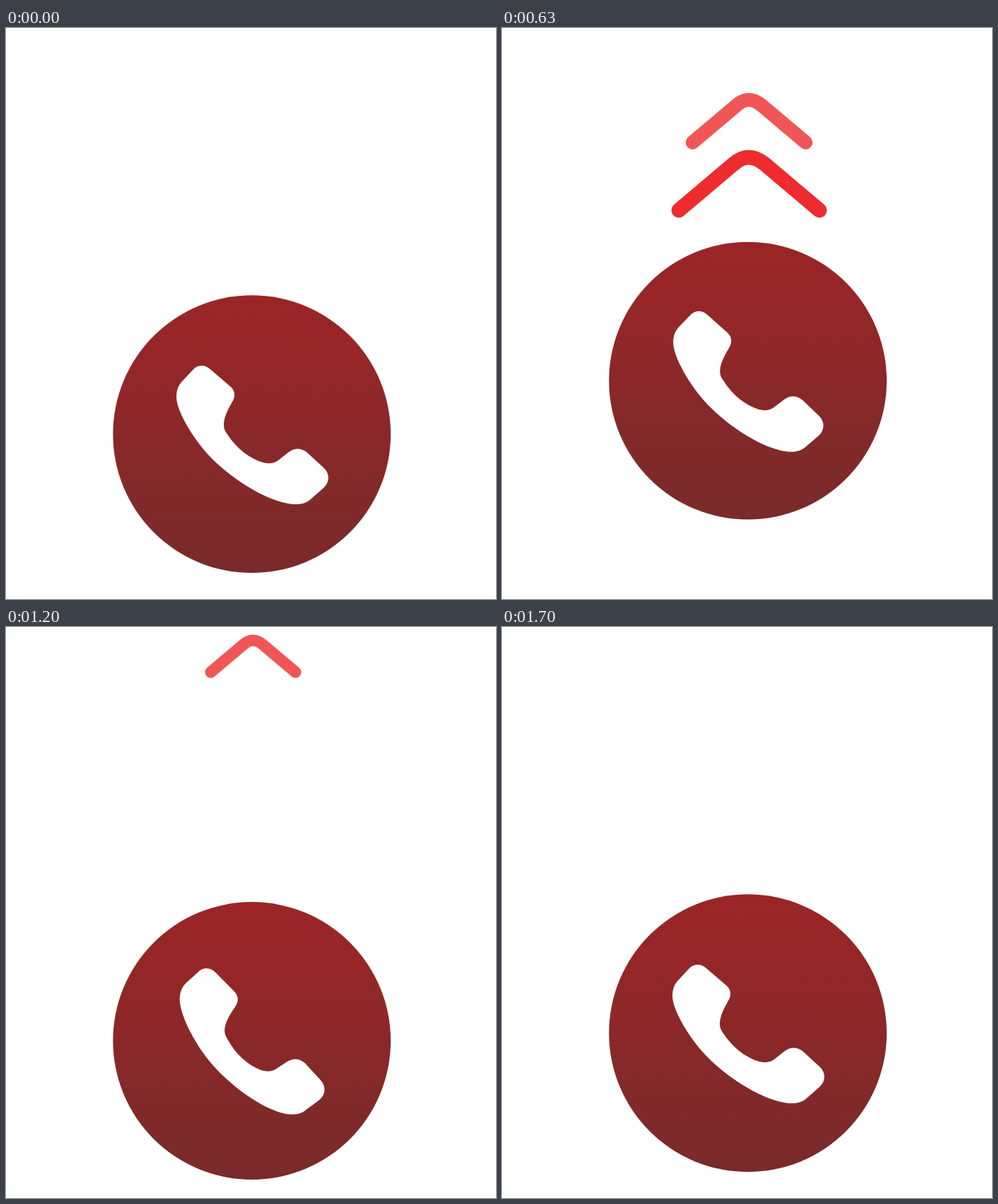
Write an HTML page with a canvas that moves like this. It is 693 px wide and 808 px high and loops after 2000 ms.

```html
<!DOCTYPE html>
<html lang="en">
<head>
<meta charset="utf-8">
<title>Incoming call</title>
<style>
  html, body { margin: 0; width: 100%; height: 100%; overflow: hidden; background: #fff; }
  canvas { display: block; }
</style>
</head>
<body>
<canvas id="stage" width="693" height="808"></canvas>
<script>
const ctx = document.getElementById('stage').getContext('2d');
const LOOP = 2000;
const CENTER = { x: 347.7, y: 574.7, r: 196.4 };

const handset = new Path2D(
  'M289 483 L317 507 C324 513 325 521 320 529 C313 541 308 552 308 562 ' +
  'C308 567 310 571 313 575 C326 595 344 609 364 615 C373 617 380 616 386 611 ' +
  'L400 600 C408 594 417 594 425 600 L449 622 C458 630 458 642 450 650 ' +
  'L433 665 C427 671 420 674 410 674 C380 674 331 647 296 614 ' +
  'C264 583 241 541 241 522 C241 512 244 505 250 499 L264 484 C271 476 281 476 289 483 Z');

const discFill = ctx.createLinearGradient(0, CENTER.y - CENTER.r, 0, CENTER.y + CENTER.r);
discFill.addColorStop(0, '#9b2526');
discFill.addColorStop(0.2, '#962627');
discFill.addColorStop(0.85, '#7d2a2a');
discFill.addColorStop(1, '#7a2a2a');

// Ticks run at 30 per second.
const chevrons = [
  { half: 99.5, y: 258, width: 21, show: 10, hide: 25 },
  { half: 80, y: 162, width: 19.6, show: 15, hide: 30 },
  { half: 60, y: 64, width: 16.2, show: 20, hide: 35 }
];
const FADE = 5;

const clamp = v => Math.min(1, Math.max(0, v));
const smooth = v => v * v * (3 - 2 * v);
const easeOut = v => 1 - (1 - v) * (1 - v);

// Each key is [tick, value, easing towards it].
function track(keys, tick) {
  let value = keys[0][1];
  for (let i = 1; i < keys.length; i++) {
    const [start, from] = keys[i - 1];
    const [end, to, ease = smooth] = keys[i];
    if (tick >= start) value = from + (to - from) * ease(clamp((tick - start) / (end - start)));
  }
  return value;
}

const lift = [[10, 0], [20, -76.3, easeOut], [29.7, -76.3], [36.8, 14], [44.6, -11.5], [51, 0]];
const tilt = [[11, 0], [19, 1.2], [31, 1.2], [35.5, 4.8], [42, 0]];

function drawChevron({ half, y, width, show, hide }, tick) {
  const alpha = Math.min(clamp((tick - show) / FADE), 1 - clamp((tick - hide) / FADE));
  if (alpha <= 0) return;
  const x = 349.5, bend = half * 0.216, rise = half * 0.845;
  const bendY = y - rise * 0.784;
  ctx.globalAlpha = alpha;
  ctx.lineWidth = width;
  ctx.beginPath();
  ctx.moveTo(x - half, y);
  ctx.lineTo(x - bend, bendY);
  ctx.quadraticCurveTo(x - 1, y - rise, x + bend, bendY);
  ctx.lineTo(x + half, y);
  ctx.stroke();
  ctx.globalAlpha = 1;
}

function drawButton(tick) {
  const { x, y, r } = CENTER;
  ctx.save();
  ctx.translate(0, track(lift, tick));
  ctx.fillStyle = discFill;
  ctx.beginPath();
  ctx.arc(x, y, r, 0, Math.PI * 2);
  ctx.fill();
  ctx.translate(x, y);
  ctx.rotate(track(tilt, tick) * Math.PI / 180);
  ctx.translate(-x, -y);
  ctx.fillStyle = '#fff';
  ctx.fill(handset);
  ctx.restore();
}

function draw(now) {
  const tick = Math.floor((now % LOOP + 4) * 0.03);
  ctx.fillStyle = '#fff';
  ctx.fillRect(0, 0, 693, 808);
  ctx.strokeStyle = '#ee2c2d';
  ctx.lineCap = ctx.lineJoin = 'round';
  chevrons.forEach(c => drawChevron(c, tick));
  drawButton(tick);
}

const begin = performance.now();
function loop() {
  draw(performance.now() - begin);
  requestAnimationFrame(loop);
}
loop();
</script>
</body>
</html>
```
